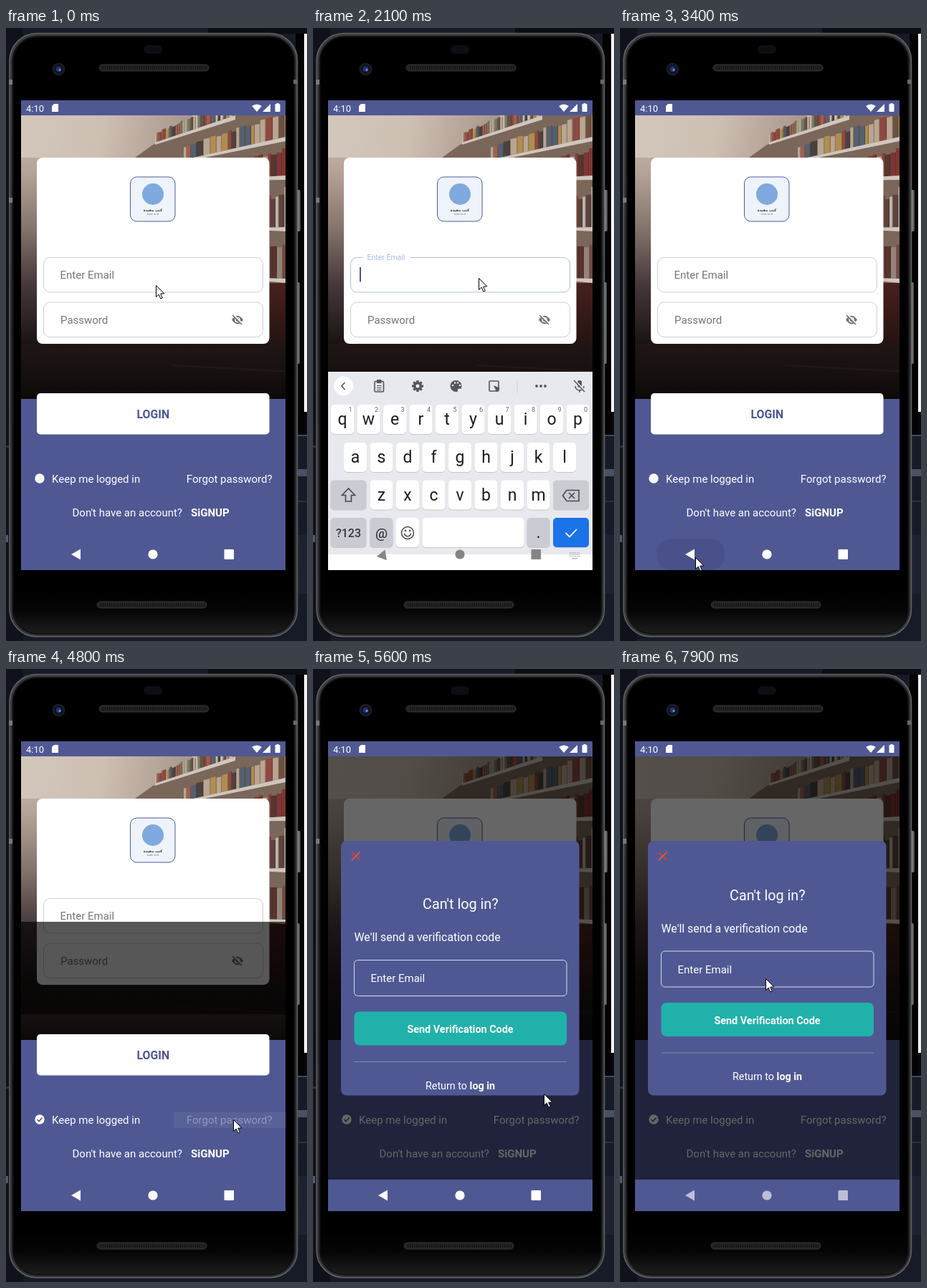
Animation of 420x856 px, one loop 8000 ms. Source, as an HTML page with a canvas:

```html
<!DOCTYPE html>
<html lang="en">
<head>
<meta charset="utf-8">
<title>Login screen</title>
<style>
html, body { margin: 0; width: 100%; height: 100%; overflow: hidden; background: #000; }
canvas { display: block; width: 420px; height: 856px; }
</style>
</head>
<body>
<canvas id="stage" width="420" height="856"></canvas>
<script>
const ctx = document.getElementById('stage').getContext('2d');
const LOOP = 8000, STEP = 100;
const PURPLE = '#505893';
const FONT = 'Roboto, "Noto Sans", sans-serif';

// Pointer path: time, x, y
const POINTER = [
  [0, 209, 359], [400, 209, 359], [800, 220, 362], [1200, 229, 358], [1500, 231, 349],
  [2100, 231, 349], [2300, 215, 420], [2700, 105, 739], [3400, 105, 739],
  [3700, 178, 629], [3900, 178, 629], [4500, 317, 629], [5000, 317, 629],
  [5500, 322, 593], [5700, 322, 593], [6400, 292, 430], [6500, 290, 425],
  [7000, 268, 315], [7300, 268, 315], [7800, 203, 432], [8000, 203, 432]
];

const clamp = v => Math.max(0, Math.min(1, v));
const ramp = (t, a, b) => clamp((t - a) / (b - a));
const ease = v => v * v * (3 - 2 * v);
const mix = (a, b, v) => a + (b - a) * v;

function rect(x0, y0, x1, y1, fill) {
  ctx.fillStyle = fill;
  ctx.fillRect(x0, y0, x1 - x0, y1 - y0);
}

function box(x0, y0, x1, y1, r, fill, stroke, width = 1) {
  ctx.beginPath();
  ctx.roundRect(x0, y0, x1 - x0, y1 - y0, r);
  if (fill) { ctx.fillStyle = fill; ctx.fill(); }
  if (stroke) { ctx.strokeStyle = stroke; ctx.lineWidth = width; ctx.stroke(); }
}

function dot(x, y, r, fill) {
  ctx.beginPath();
  ctx.arc(x, y, r, 0, 7);
  ctx.fillStyle = fill;
  ctx.fill();
}

function poly(points, fill) {
  ctx.beginPath();
  points.forEach(p => ctx.lineTo(...p));
  ctx.closePath();
  ctx.fillStyle = fill;
  ctx.fill();
}

function line(points, color, width = 1) {
  ctx.beginPath();
  points.forEach(p => ctx.lineTo(...p));
  ctx.strokeStyle = color;
  ctx.lineWidth = width;
  ctx.stroke();
}

function text(str, x, y, size, color, align = 'left', weight = 400) {
  ctx.font = `${weight} ${size}px ${FONT}`;
  ctx.textAlign = align;
  ctx.textBaseline = 'alphabetic';
  ctx.fillStyle = color;
  ctx.fillText(str, x, y);
}

function shade(x0, y0, x1, y1, ...stops) {
  const g = ctx.createLinearGradient(x0, y0, x1, y1);
  stops.forEach((c, i) => g.addColorStop(i / (stops.length - 1), c));
  return g;
}

function random(seed) {
  return () => (seed = (seed * 16807) % 2147483647) / 2147483647;
}

function drawPhone() {
  rect(0, 0, 420, 856, '#171a27');
  rect(0, 0, 24, 856, '#10121b');
  rect(282, 0, 420, 8, '#0c0d12');
  rect(404, 8, 416, 570, '#030304');
  rect(416, 8, 420, 536, '#f4f4f4');
  rect(416, 536, 420, 568, '#07080b');
  rect(404, 568, 420, 570, '#444a5a');
  rect(404, 616, 420, 626, '#4b5064');
  rect(404, 660, 420, 662, '#2b3042');
  rect(404, 708, 420, 790, '#1e2230');
  rect(0, 583, 5, 586, '#2b3042');
  rect(0, 708, 3, 718, '#535a70');
  box(404, 226, 411, 284, 2, shade(404, 0, 411, 0, '#222', '#8a8a8a', '#444'));
  box(404, 355, 410, 469, 2, shade(404, 0, 410, 0, '#222', '#8a8a8a', '#444'));
  // Metal rim, then the glass front
  box(5, 7.5, 406.5, 850, 38, shade(0, 7, 0, 850, '#3a3b3d', '#2a2b2d', '#343537'), '#606265', 1.5);
  box(9.5, 12, 402.5, 846, 34, shade(0, 780, 0, 846, '#000', '#050505', '#1d1d1e'), '#131314', 2);
  for (const y of [72, 237]) rect(4, y, 9, y + 7, '#77797c');
  rect(401, 72, 407, 78, '#66686b');

  for (const [x, y] of [[130, 51], [127, 801]]) {
    box(x, y, x + 153, y + 9, 4.5, '#242424', '#343434', 1);
    for (let i = 5; i < 150; i += 3) rect(x + i, y + 2, x + i + 1, y + 7, '#111');
  }
  box(192, 24, 218, 36, 6, '#0d0d14');
  dot(73.5, 57.5, 9, '#1b1d22');
  dot(73.5, 57.5, 6.5, '#10131f');
  dot(73.5, 57.5, 3.8, '#1f3476');
  dot(75, 58.5, 1.5, '#7492dd');
}

// Row of books standing on a slanted board
function books(x0, x1, y0, y1, height, width, seed, colors) {
  const rnd = random(seed);
  const base = x => mix(y0, y1, (x - x0) / (x1 - x0));
  for (let x = x0; x < x1;) {
    const w = width * (.6 + rnd() * .8);
    const h = height * mix(.55, 1, (x - x0) / (x1 - x0)) * (.8 + rnd() * .2);
    const color = colors[Math.floor(rnd() * colors.length)];
    poly([[x, base(x)], [x, base(x) - h], [x + w, base(x + w) - h], [x + w, base(x + w)]], color);
    rect(x + w - 1, base(x + w) - h, x + w, base(x + w), 'rgba(40,25,20,.35)');
    x += w;
  }
  poly([[x0, y0], [x1, y1], [x1, y1 + 6], [x0, y0 + 3]], '#cfc6be');
}

function drawPhoto() {
  const tones = ['#8d4a42', '#b9a590', '#56606e', '#c9bcae', '#6b5145', '#b08d50', '#6f7a62', '#a0604f', '#4a4140'];
  ctx.save();
  ctx.beginPath();
  ctx.rect(21, 122, 369, 396);
  ctx.clip();
  rect(21, 122, 390, 518, shade(0, 122, 0, 518, '#cdc0b5', '#b5a398', '#84736b', '#45373a', '#1c1414', '#110b0b'));
  rect(21, 122, 260, 181, shade(21, 122, 250, 165, '#d3c7bc', '#cdbfb2', '#a8968a'));
  poly([[180, 181], [205, 163], [310, 122], [390, 122], [390, 356], [330, 356], [300, 181]], '#7b665a');
  books(208, 320, 160, 122, 26, 4, 31, tones);
  books(248, 390, 184, 152, 38, 7, 77, tones);
  books(320, 390, 210, 206, 42, 6, 58, ['#7e3533', '#8d4039', '#55372f', '#b7a49a']);
  books(350, 390, 279, 278, 62, 6, 91, ['#a8968c', '#8a4039', '#c3b5ab', '#5a443d']);
  books(350, 390, 349, 350, 62, 6, 15, ['#94837a', '#70483f', '#82584e', '#5b322d']);
  rect(340, 356, 390, 518, shade(0, 356, 0, 518, '#47211e', '#261412', '#130b0a'));
  rect(21, 441, 390, 518, shade(0, 441, 0, 518, '#1f1615', '#171010', '#0e0909'));
  poly([[230, 470], [390, 478], [390, 481], [230, 472]], 'rgba(90,65,55,.15)');
  ctx.restore();
}

function drawStatus() {
  rect(21, 101, 390, 122, PURPLE);
  text('4:10', 28, 116.5, 13, '#fff');
  poly([[64, 109], [67, 106], [73, 106], [73, 117], [64, 117]], '#fff');
  ctx.beginPath();
  ctx.moveTo(350, 117);
  ctx.arc(350, 117, 10.5, -2.28, -.86);
  ctx.fillStyle = '#fff';
  ctx.fill();
  poly([[369, 106], [369, 117], [358, 117]], '#fff');
  box(375.5, 106, 382.5, 117, 1, '#fff');
  rect(377.5, 105, 380.5, 107, '#fff');
}

function drawEye(x, y) {
  const c = '#707070';
  ctx.beginPath();
  ctx.moveTo(x - 8, y);
  ctx.quadraticCurveTo(x, y - 11.5, x + 8, y);
  ctx.quadraticCurveTo(x, y + 11.5, x - 8, y);
  ctx.fillStyle = c;
  ctx.fill();
  dot(x, y, 3.8, '#fff');
  dot(x, y, 2.4, c);
  line([[x - 5.5, y - 7], [x + 7.5, y + 6]], '#fff', 2);
  line([[x - 7, y - 6.5], [x + 6, y + 6.5]], c, 1.6);
}

function drawCard(t) {
  const focus = t < 3000 ? ease(ramp(t, 1400, 1700)) : 0;
  box(43, 181, 367.5, 441, 8, '#fff');
  box(173.5, 208, 236, 270, 9, '#eff3fc', '#4b5b9c', 1);
  dot(205, 232, 15, '#7fa9df');
  ctx.direction = 'rtl';
  ctx.font = 'bold 5px "DejaVu Sans", sans-serif';
  ctx.textAlign = 'center';
  ctx.fillStyle = '#333';
  ctx.fillText('كتب مفيدة', 205, 256);
  ctx.direction = 'ltr';
  text('books for all', 205, 260.5, 3, '#777', 'center');

  box(52.5, 320.5, 358.5, 369, 9, '#fff', focus ? '#a8c1de' : '#cfcfcf');
  if (focus > .5) rect(70, 318, 135, 323, '#fff');
  text('Enter Email', 75.5, mix(350, 323.5, focus), mix(15, 10.5, focus), focus ? '#a5bce2' : '#757575');
  if (focus === 1 && t % 1000 < 500) rect(65, 334, 67, 354.5, '#4b548f');
  box(52.5, 383, 358.5, 431.5, 9, '#fff', '#cfcfcf');
  text('Password', 76, 412.5, 15, '#757575');
  drawEye(323, 407.5);
}

function drawForm(t) {
  rect(21, 518, 390, 757, PURPLE);
  box(43, 510, 367.5, 567.5, 5, '#fff');
  text('LOGIN', 205.3, 545, 15.8, '#4a5496', 'center', 700);
  dot(47, 629, 6.7, '#fff');
  if (t >= 3800) line([[43.5, 629], [46, 631.7], [50.5, 626.5]], PURPLE, 1.6);
  text('Keep me logged in', 64, 634.7, 15, '#fff');
  const pressed = t >= 4700 && t < 4900;
  if (pressed) rect(234, 619, 390, 641, 'rgba(255,255,255,.05)');
  text('Forgot password?', 371.5, 634.7, 15, pressed ? 'rgba(255,255,255,.35)' : '#fff', 'right');
  text("Don't have an account?", 92.5, 682, 15, '#fff');
  text('SiGNUP', 258, 682, 15, '#fff', 'left', 700);
}

function drawNav(color, angle = 0) {
  ctx.save();
  ctx.translate(98, 735);
  ctx.rotate(angle);
  poly([[-7, 0], [6, -7.5], [6, 7.5]], color);
  ctx.restore();
  dot(205, 735, 6.6, color);
  box(304.5, 728, 318, 742, 1, color);
}

function key(x, y, w, label, fill = '#fff', size = 23) {
  box(x - w / 2, y + 1, x + w / 2, y + 42, 5, '#c6c7cc');
  box(x - w / 2, y, x + w / 2, y + 41, 5, fill);
  if (label) text(label, x, y + 28, size, '#1c1c1f', 'center');
}

function drawTools() {
  const c = '#53565b';
  dot(42.5, 500, 13.5, '#fff');
  line([[44.5, 495], [40, 500], [44.5, 505]], c, 1.7);
  box(86, 493.5, 98.5, 508, 1, null, c, 1.6);
  rect(89, 491, 95.5, 496, c);
  for (const y of [499, 502, 505]) rect(89, y, 95.5, y + 1.1, c);
  for (let i = 0; i < 4; i++) {
    const a = i * Math.PI / 4, dx = Math.cos(a) * 8, dy = Math.sin(a) * 8;
    line([[146 - dx, 500 - dy], [146 + dx, 500 + dy]], c, 3.4);
  }
  dot(146, 500, 6, c);
  dot(146, 500, 2.5, '#e8e9ee');
  dot(199.5, 500, 8, c);
  for (const [x, y] of [[195, 499], [198, 495.5], [202, 495.5], [205, 499]]) dot(x, y, 1.3, '#e8e9ee');
  dot(204.5, 506, 2.6, '#e8e9ee');
  box(246, 493, 259, 507, 1, null, c, 1.6);
  poly([[252, 499], [261, 503], [256, 508]], c);
  rect(284.5, 491, 285.5, 510, '#cfd0d6');
  for (const x of [312, 318, 324]) dot(x, 500, 1.9, c);
  box(369, 492, 375, 502, 3, c);
  ctx.beginPath();
  ctx.arc(372, 500, 6, 0, Math.PI);
  ctx.strokeStyle = c;
  ctx.lineWidth = 1.5;
  ctx.stroke();
  rect(371.2, 505, 372.8, 509, c);
  line([[365, 492], [380, 508]], '#e8e9ee', 3);
  line([[364, 492], [379, 508]], c, 1.5);
}

function drawKeyboard(t) {
  const grey = '#cbccd3', ink = '#46484d';
  rect(21, 480, 390, 735, '#e8e9ee');
  rect(21, 735, 390, 757, '#fff');
  drawTools();
  [...'qwertyuiop'].forEach((c, i) => {
    const x = 41 + i * 36.5;
    key(x, 526, 32, c);
    text(String((i + 1) % 10), x + 11, 536, 9, '#606368', 'center');
  });
  [...'asdfghjkl'].forEach((c, i) => key(59 + i * 36.5, 579, 32, c));
  [...'zxcvbnm'].forEach((c, i) => key(95.5 + i * 36.5, 631.5, 32, c));
  key(49.5, 631.5, 50, '', grey);
  key(360, 631.5, 50, '', grey);
  line([[49.5, 643], [40.5, 652.5], [45.5, 652.5], [45.5, 661], [53.5, 661], [53.5, 652.5], [58.5, 652.5], [49.5, 643], [45, 648]], ink, 1.6);
  line([[348.5, 653], [354, 645.5], [371, 645.5], [371, 660.5], [354, 660.5], [348.5, 653], [354, 645.5]], ink, 1.6);
  line([[357, 649], [365, 657]], ink, 1.6);
  line([[365, 649], [357, 657]], ink, 1.6);
  key(49.5, 684, 50, '', grey);
  text('?123', 49.5, 711, 16, '#34363a', 'center', 500);
  key(95.5, 684, 32, '@', grey, 19);
  key(132, 684, 32, '');
  ctx.strokeStyle = ink;
  ctx.lineWidth = 1.5;
  for (const [r, a, b] of [[8.5, 0, 7], [4.7, .15, 3]]) {
    ctx.beginPath();
    ctx.arc(132, 705, r, a, b);
    ctx.stroke();
  }
  dot(129, 702, 1.3, ink);
  dot(135, 702, 1.3, ink);
  key(223.5, 684, 142, '');
  key(314.5, 684, 32, '.', grey);
  key(360, 684, 50, '', '#1a73e8');
  line([[352.5, 705], [358, 710.5], [368, 700]], '#fff', 1.8);
  // The back arrow turns to point down
  drawNav('#858585', t < 2200 ? -4.35 : -Math.PI / 2);
  for (let i = 0; i < 18; i++) {
    const x = 358 + i % 6 * 2.5, y = 732 + Math.floor(i / 6) * 2.5;
    rect(x, y, x + 1.5, y + 1.5, '#b5b5b5');
  }
  rect(361, 740, 369, 741.5, '#b5b5b5');
}

function drawDialog(t) {
  const up = 12.5 * ramp(t, 6500, 6800);
  const glow = ramp(t, 6700, 7000) * (1 - ramp(t, 7200, 7500));
  rect(21, 122, 390, 713, 'rgba(0,0,0,.6)');
  ctx.save();
  box(39, 240, 371.5, 595.5, 8, PURPLE);
  ctx.clip();
  line([[54, 256], [65.5, 266.5]], '#e5392f', 1.8);
  line([[65.5, 255.5], [54, 267]], '#e8602f', 1.6);
  ctx.translate(0, -up);
  text("Can't log in?", 205.8, 335, 19.8, '#fff', 'center');
  text("We'll send a verification code", 57.5, 380, 15.9, '#fff');
  box(57.5, 406.5, 354, 456.5, 5, null, '#d9dbe8');
  text('Enter Email', 80.5, 437, 15, '#fff');
  box(57.5, 478.5, 354, 525.5, 7, '#20b2aa');
  text('Send Verification Code', 205.5, 508, 14.4, '#fff', 'center', 700);
  rect(57.5, 548, 354, 549, '#8488a6');
  text('Return to ', 157, 586.5, 14.3, '#fff');
  text('log in', 254, 586.5, 14.3, '#fff', 'right', 700);
  ctx.translate(0, up);
  if (glow) {
    ctx.beginPath();
    ctx.ellipse(225, 606, 185, 50 * glow, 0, 0, 7);
    ctx.fillStyle = `rgba(50,115,185,${.5 * glow})`;
    ctx.fill();
  }
  ctx.restore();
}

function drawPointer(t) {
  const i = Math.max(1, POINTER.findIndex(p => p[0] > t));
  const [a, b] = [POINTER[i - 1], POINTER[i]];
  const k = ease(ramp(t, a[0], b[0]));
  ctx.save();
  ctx.translate(mix(a[1], b[1], k) + .5, mix(a[2], b[2], k) + .5);
  const arrow = [[0, 0], [0, 16], [3.7, 12.6], [6.3, 18.5], [8.8, 17.4], [6.2, 11.7], [11.3, 11.4]];
  poly(arrow, '#fff');
  line([...arrow, arrow[0]], '#000', 1);
  ctx.restore();
}

function draw(t) {
  drawPhone();
  drawPhoto();
  drawStatus();
  drawCard(t);
  drawForm(t);
  if (t >= 2100 && t < 2900) {
    drawKeyboard(t);
  } else {
    const press = ramp(t, 3100, 3300) * (1 - ramp(t, 3500, 3700));
    if (press) box(51, 713, 146, 757, 20, `rgba(30,35,70,${.11 * press})`);
    const fade = ramp(t, 5700, 6100);
    drawNav(`rgba(255,255,255,${1 - .38 * fade})`);
  }
  if (t >= 4900) drawDialog(t);
  else if (t >= 4800) rect(21, 353, 390, 482, 'rgba(0,0,0,.66)');
  drawPointer(t);
}

const start = performance.now();
function tick() {
  const t = (performance.now() - start) % LOOP;
  draw(Math.floor(t / STEP) * STEP);
  requestAnimationFrame(tick);
}
tick();
</script>
</body>
</html>
```
